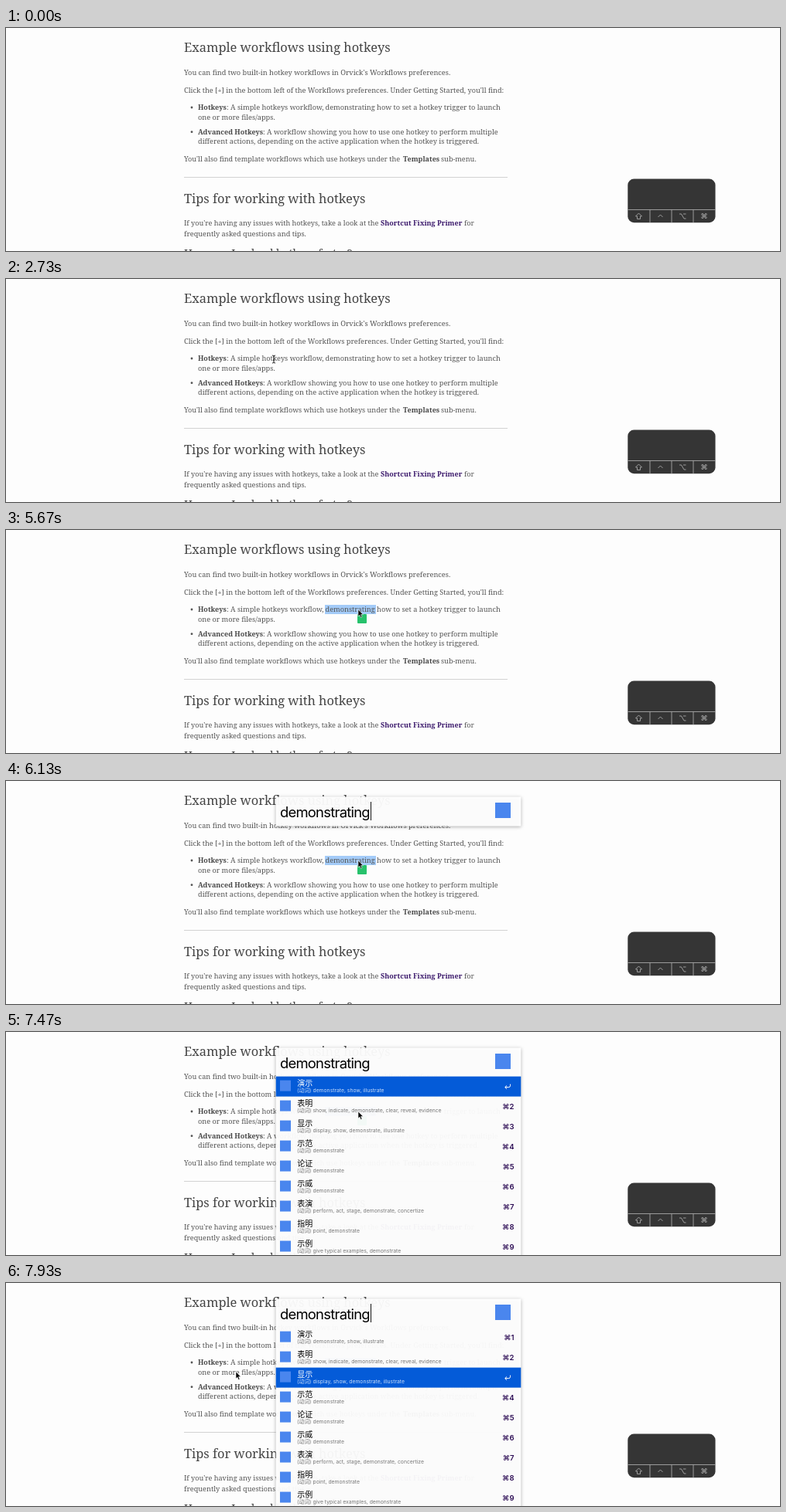
An HTML page for the animation above (8000 ms loop, 1000x289 px).

```html
<!DOCTYPE html>
<html lang="en">
<head>
<meta charset="utf-8">
<title>Translate a selected word</title>
<style>
html, body { margin: 0; width: 100%; height: 100%; overflow: hidden; background: #fdfdfd; }
svg { display: block; width: 100vw; height: 100vh; }
text { white-space: pre; }
#page { font: 9.2px "Noto Serif", serif; fill: #555; }
#page .h2 { font-size: 16.4px; fill: #444; }
#page .h3 { font-size: 13.75px; fill: #444; }
#page .tight { font-size: 9.1px; }
#page .b { font-weight: 700; font-size: 9px; fill: #484848; }
#page .link { fill: #3c1a6c; }
#popup { font-family: Inter, "Noto Sans CJK SC", "Noto Sans CJK", sans-serif; }
.panel { fill: #fff; fill-opacity: .95; filter: drop-shadow(0 1px 2px #0005); }
.query { font-size: 18.4px; letter-spacing: -.75px; }
.word { font: 500 10px "Noto Sans CJK SC", "Noto Sans CJK", sans-serif; }
.sense { font-size: 6.8px; fill: #777; }
.sense, .word { font-family: Inter, "Noto Sans CJK SC", "Noto Sans CJK", sans-serif; }
.key { font-size: 9.5px; font-weight: 600; text-anchor: end; fill: #2c0c54; }
.logo { fill: #4a86ee; }
.enter { fill: none; stroke: #fff; visibility: hidden; }
.on .word { fill: #fff; }
.on .sense { fill: #c9dcf8; }
.on .key { visibility: hidden; }
.on .enter { visibility: visible; }
#keys path { fill: none; stroke: #b5b5b5; stroke-width: .8; }
#keys text { font: 9.5px Inter, "DejaVu Sans", sans-serif; text-anchor: middle; fill: #b5b5b5; }
#keys .lit { stroke: #fff; stroke-width: 1.3; }
</style>
</head>
<body>
<svg viewBox="0 0 1000 289">
  <rect id="mark" x="412" y="97" width="66" height="12" fill="#a3cbf8"/>
  <g id="page">
    <text class="h2" x="230" y="31">Example workflows using hotkeys</text>
    <text x="230" y="60.5">You can find two built-in hotkey workflows in Orvick's Workflows preferences.</text>
    <text x="230" y="83.5">Click the [+] in the bottom left of the Workflows preferences. Under Getting Started, you'll find:</text>
    <circle cx="240" cy="103" r="1.4"/>
    <text y="106"><tspan class="b" x="248">Hotkeys</tspan><tspan x="285">: A simple hotkeys workflow, </tspan><tspan x="412.5">demonstrating how to set a hotkey trigger to launch</tspan></text>
    <text x="248" y="118.5">one or more files/apps.</text>
    <circle cx="240" cy="134.7" r="1.4"/>
    <text y="137.8"><tspan class="b" x="248">Advanced Hotkeys</tspan><tspan x="332">: A workflow showing you how to use one hotkey to perform multiple</tspan></text>
    <text x="248" y="150.3">different actions, depending on the active application when the hotkey is triggered.</text>
    <text class="tight" y="173.3"><tspan x="230">You'll also find template workflows which use hotkeys under the</tspan><tspan class="b" x="513">Templates</tspan><tspan x="562">sub-menu.</tspan></text>
    <path d="M230 193.5H648" stroke="#d2d2d2"/>
    <text class="h2" x="230" y="227">Tips for working with hotkeys</text>
    <text class="tight" y="256.3"><tspan x="230">If you're having any issues with hotkeys, take a look at the</tspan><tspan class="b link" x="484">Shortcut Fixing Primer</tspan><tspan x="592">for</tspan></text>
    <text x="230" y="270.3">frequently asked questions and tips.</text>
    <text class="h3" x="230" y="297.3">How can I upload hotkeys faster?</text>
  </g>
  <rect id="badge" x="454" y="109" width="12" height="12" rx="1" fill="#27c26c"/>

  <g id="keys">
    <rect x="803.3" y="195.6" width="113.2" height="56.6" rx="8" fill="#353535"/>
    <path d="M803.5 235.5H916.5M832 235.5V252M860 235.5V252M888 235.5V252"/>
    <path d="M817.5 240l4 4h-2v3.5h-4v-3.5h-2z"/>
    <path d="M842.5 245l3-3 3 3"/>
    <path id="option" d="M870 241h2.5l3.5 6h2.5M875 241h3.5"/>
    <text x="902" y="247.2">⌘</text>
  </g>

  <g id="popup">
    <rect id="panel" class="panel" x="348.7" y="20.5" width="316.6"/>
    <text class="query" x="354" y="46.5">demonstrating</text>
    <path id="caret" d="M471.5 27V51" stroke="#111"/>
    <rect class="logo" x="632" y="28" width="20" height="20"/>
    <g id="list">
      <rect id="bar" x="348.7" width="316.6" height="26"/>
    </g>
  </g>

  <path id="beam" d="M-2-5q2 0 2 1.5v7q0 1.5-2 1.5M2-5q-2 0-2 1.5M2 5q-2 0-2-1.5M-1 1h2" fill="none" stroke="#222"/>
  <path id="arrow" d="M0 0v9l2-1.8 1.4 3.2 1.6-.7-1.4-3.1h2.8z" stroke="#fff" stroke-width=".6"/>
</svg>
<script>
const $ = id => document.getElementById(id);
const LOOP = 8000, STEP = 1000 / 15, ROW = 26, TOP = 57.6;

const results = [
  ['演示', 'demonstrate, show, illustrate'],
  ['表明', 'show, indicate, demonstrate, clear, reveal, evidence'],
  ['显示', 'display, show, demonstrate, illustrate'],
  ['示范', 'demonstrate'],
  ['论证', 'demonstrate'],
  ['示威', 'demonstrate'],
  ['表演', 'perform, act, stage, demonstrate, concertize'],
  ['指明', 'point, demonstrate'],
  ['示例', 'give typical examples, demonstrate'],
];

$('bar').setAttribute('fill', '#045bd8');
$('list').insertAdjacentHTML('beforeend', results.map(([word, sense], i) => `
  <g class="row" lang="zh-CN" transform="translate(0 ${TOP + ROW * i})">
    <rect class="logo" x="354" y="5" width="14" height="14"/>
    <text class="word" x="376.3" y="12">${word}</text>
    <text class="sense" x="376" y="20.6">(动词) ${sense}</text>
    <text class="key" x="656.5" y="16.5">⌘${i + 1}</text>
    <path class="enter" d="M651.5 10v2q0 2-2 2h-4.5M647 11.8l-2.3 2.2 2.3 2.2"/>
  </g>`).join(''));
const rows = document.querySelectorAll('.row');

// Pointer path: time, x, y
const path = [
  [70, 440, 12], [800, 358, 104], [1330, 336, 103], [2000, 335, 104],
  [2733, 346, 104], [2900, 348, 104], [3470, 455, 104], [5130, 455, 103],
  [7600, 455, 103], [7733, 425, 105], [7800, 382, 108.5], [7867, 318, 113.5], [7933, 297, 115],
];

function pointerAt(t) {
  const i = path.findIndex(p => p[0] > t);
  if (i < 0) return path.at(-1).slice(1);
  if (i === 0) return path[0].slice(1);
  const [t0, x0, y0] = path[i - 1], [t1, x1, y1] = path[i];
  const k = (t - t0) / (t1 - t0);
  return [x0 + (x1 - x0) * k, y0 + (y1 - y0) * k];
}

const show = (id, on) => $(id).setAttribute('visibility', on ? 'visible' : 'hidden');

function draw(t) {
  const open = t >= 5930, listed = t >= 6390;
  const selected = t >= 7930 ? 2 : t >= 7590 ? 1 : 0;
  const [x, y] = pointerAt(t);

  show('mark', t >= 3790);
  show('badge', t >= 4060);
  $('option').classList.toggle('lit', t >= 5190 && t < 5520);

  $('popup').style.display = open ? '' : 'none';
  $('list').style.display = listed ? '' : 'none';
  $('panel').setAttribute('height', listed ? 290 : 38);
  $('bar').setAttribute('y', TOP + ROW * selected);
  rows.forEach((row, i) => row.classList.toggle('on', i === selected));
  show('caret', open && (t - 5900) % 1000 < 500);

  const arrow = t >= 5130;
  show('beam', t >= 66 && !arrow);
  show('arrow', arrow);
  $(arrow ? 'arrow' : 'beam').setAttribute('transform', `translate(${x} ${y})`);
}

const start = performance.now();
function tick() {
  const t = (performance.now() - start) % LOOP;
  draw(Math.floor((t + 4) / STEP) % 120 * STEP);
  requestAnimationFrame(tick);
}
tick();
</script>
</body>
</html>
```
